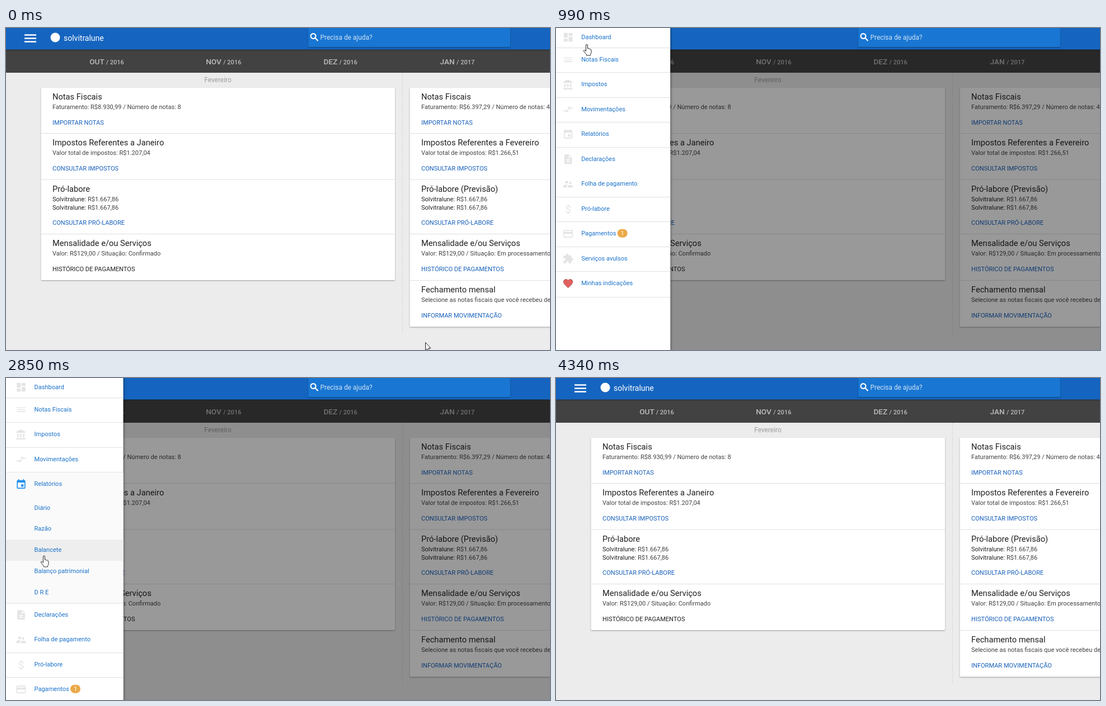
Write an HTML page that moves like this. It is 972 px wide and 576 px high and loops after 4580 ms.

```html
<!DOCTYPE html>
<html lang="pt-BR">
<head>
<meta charset="utf-8">
<title>Menu de relatórios</title>
<style>
  html, body { margin: 0; width: 100%; height: 100%; overflow: hidden; background: #ececec; }
  svg { display: block; width: 972px; height: 576px; font: 11.05px Roboto, sans-serif; }
  .title { font-size: 14.65px; fill: #212121; }
  .text { fill: #424242; }
  .name { fill: #212121; }
  .link { fill: #1760bb; }
  .dark { fill: #212121; }
  .month { font-size: 13.6px; font-weight: 500; fill: #bdbdbd; text-anchor: middle; }
  .month tspan { font-size: 11.05px; }
  .item { fill: #1b72cb; }
  .icon { fill: #e4e4e4; }
  .line { stroke: #e0e0e0; }
  .lift { filter: drop-shadow(0 1px 1px rgba(0, 0, 0, .35)); }
  .side { filter: drop-shadow(1px 0 2px rgba(0, 0, 0, .45)); }

  #shade, #drawer, #active, #hover, #lower, #cursor, #arrow, #hand {
    animation: 4580ms linear infinite paused;
  }
  #shade { animation-name: shade; }
  #drawer { animation-name: drawer; }
  #lower { animation-name: lower; }
  #cursor { animation-name: cursor; }
  #active { animation-name: active; animation-timing-function: step-end; }
  #hover { animation-name: hover; animation-timing-function: step-end; }
  #arrow { animation-name: arrow; animation-timing-function: step-end; }
  #hand { animation-name: hand; animation-timing-function: step-end; }

  @keyframes shade {
    0%, 15.72% { opacity: 0; }
    21.2%, 82.7% { opacity: .4; }
    88.9%, 100% { opacity: 0; }
  }
  @keyframes drawer {
    0%, 15.84% { transform: translateX(-220px); }
    15.86% { transform: translateX(-210px); animation-timing-function: cubic-bezier(.25, .46, .45, .94); }
    22.41%, 81.5% { transform: translateX(0); }
    87.4% { transform: translateX(-210px); }
    87.5%, 100% { transform: translateX(-220px); }
  }
  @keyframes lower {
    0% { transform: translateY(0); }
    39.3% { transform: translateY(0); animation-timing-function: cubic-bezier(.165, .84, .44, 1); }
    49.1%, 100% { transform: translateY(189px); }
  }
  @keyframes active {
    0% { opacity: 0; }
    30%, 100% { opacity: 1; }
  }
  @keyframes hover {
    0% { opacity: 0; transform: translateY(38px); }
    53.8% { opacity: 1; transform: translateY(38px); }
    55.5% { opacity: 1; transform: translateY(76px); }
    57.2% { opacity: 1; transform: translateY(114px); }
    62% { opacity: 1; transform: translateY(76px); }
    65.4% { opacity: 1; transform: translateY(38px); }
    68.7% { opacity: 1; transform: translateY(0); }
    77%, 100% { opacity: 0; transform: translateY(0); }
  }
  @keyframes cursor {
    0% { transform: translate(749px, 562px); animation-timing-function: ease-in-out; }
    11.13%, 12.6% { transform: translate(59px, 28px); }
    13.1% { transform: translate(52px, 26px); }
    16.4%, 23.2% { transform: translate(49px, 29px); }
    26.6% { transform: translate(51px, 132px); }
    28.4% { transform: translate(51px, 150px); }
    31.7% { transform: translate(51px, 178px); }
    35% { transform: translate(50px, 184px); }
    38.4%, 50.4% { transform: translate(51px, 193px); }
    52.2% { transform: translate(54px, 205px); }
    57.2% { transform: translate(66px, 363px); }
    62.2% { transform: translate(62px, 318px); }
    66.8% { transform: translate(50px, 255px); }
    73.8% { transform: translate(45px, 209px); }
    75.5% { transform: translate(90px, 225px); }
    77.3% { transform: translate(195px, 270px); }
    82.7% { transform: translate(614px, 477px); }
    86.25% { transform: translate(783px, 546px); }
    90%, 100% { transform: translate(890px, 600px); }
  }
  @keyframes arrow {
    0% { opacity: 1; }
    13% { opacity: 0; }
    76.5%, 100% { opacity: 1; }
  }
  @keyframes hand {
    0% { opacity: 0; }
    13% { opacity: 1; }
    76.5%, 100% { opacity: 0; }
  }
</style>
</head>
<body>
<svg viewBox="0 0 972 576">
  <rect width="972" height="576" fill="#ececec"/>
  <path d="M708.5 80V547" stroke="#cfcfcf" stroke-dasharray="2 2"/>
  <text x="378.5" y="96.5" text-anchor="middle" font-size="11.9" fill="#9e9e9e">Fevereiro</text>
  <g id="cards"></g>
  <rect y="38" width="972" height="42" fill="#424242"/>
  <g id="months"></g>
  <rect id="shade" y="38" width="972" height="538"/>

  <rect class="lift" width="972" height="38.5" fill="#1565c0"/>
  <path d="M33 12.5H54M33 18.5H54M33 24.5H54" stroke="#fff" stroke-width="2.4"/>
  <circle cx="88" cy="17" r="8.5" fill="#fff"/>
  <text x="103" y="23" font-size="14" fill="#fff">solvitralune</text>
  <path class="lift" d="M540 0H901V32a2 2 0 0 1-2 2H542a2 2 0 0 1-2-2z" fill="#1976d2"/>
  <g fill="none" stroke="#fff" stroke-width="2.2">
    <circle cx="549" cy="14.5" r="4.4"/>
    <path d="M552.3 17.8L557.5 23"/>
  </g>
  <text x="561.5" y="21" font-size="11.9" fill="#cfe2f6">Precisa de ajuda?</text>

  <g id="drawer">
    <rect class="side" y="-10" width="209.5" height="596" fill="#fff"/>
    <g id="upper"></g>
    <g id="sub"></g>
    <g id="lower"><rect y="214" width="209.5" height="600" fill="#fff"/></g>
  </g>

  <g id="cursor" fill="#fff" stroke="#222" stroke-linejoin="round">
    <path id="arrow" d="M.5 .5V14.5L3.7 11.6 6 16.7 8 15.8 5.8 10.8H10z"/>
    <path id="hand" d="M4.5 12.5V2a1.5 1.5 0 0 1 3 0v5.5q2.6-.6 2.8.8 2.2-.5 2.4 1 1.3-.2 1.3 1.7v3.5q0 2-1.5 4V20h-7v-1.5L1 13q-1.3-2 0-2.5 1.2-.4 3.5 2z"/>
  </g>
</svg>
<script>
const add = (id, html) => document.getElementById(id).insertAdjacentHTML('beforeend', html);
const text = (x, y, cls, str) => `<text x="${x}" y="${y}" class="${cls}">${str}</text>`;

// Month bar
['OUT / 2016', 'NOV / 2016', 'DEZ / 2016', 'JAN / 2017'].forEach((m, i) =>
  add('months', `<text class="month" x="${180 + i * 208.8}" y="65">${m.slice(0, 3)} <tspan>${m.slice(4)}</tspan></text>`));

// Cards: each section is [top, title, lines, link, link class]
const payee = '<tspan class="name">Solvitralune:</tspan> R$1.667,86';
function card(x, width, bottom, sections) {
  let out = `<rect class="lift" x="${x}" y="107" width="${width}" height="${bottom - 107}" rx="2" fill="#fff"/>`;
  for (const [top, title, lines, link, cls = 'link'] of sections) {
    if (top > 107) out += `<path class="line" d="M${x} ${top - .5}h${width}"/>`;
    out += text(x + 20.5, top + 21, 'title', title);
    lines.forEach((l, i) => out += text(x + 20.5, top + 38 + i * 15.2, 'text', l));
    out += text(x + 20.5, top + 50.5 + lines.length * 15.2, cls, link);
  }
  add('cards', out);
}
card(62.5, 632.5, 451, [
  [107, 'Notas Fiscais', ['Faturamento: R$8.930,99 / Número de notas: 8'], 'IMPORTAR NOTAS'],
  [189, 'Impostos Referentes a Janeiro', ['Valor total de impostos: R$1.207,04'], 'CONSULTAR IMPOSTOS'],
  [271.5, 'Pró-labore', [payee, payee], 'CONSULTAR PRÓ-LABORE'],
  [369, 'Mensalidade e/ou Serviços', ['Valor: R$129,00 / Situação: Confirmado'], 'HISTÓRICO DE PAGAMENTOS', 'dark'],
]);
card(721.5, 270, 534.5, [
  [107, 'Notas Fiscais', ['Faturamento: R$6.397,29 / Número de notas: 4'], 'IMPORTAR NOTAS'],
  [189, 'Impostos Referentes a Fevereiro', ['Valor total de impostos: R$1.266,51'], 'CONSULTAR IMPOSTOS'],
  [271.5, 'Pró-labore (Previsão)', [payee, payee], 'CONSULTAR PRÓ-LABORE'],
  [369, 'Mensalidade e/ou Serviços', ['Valor: R$129,00 / Situação: Em processamento'], 'HISTÓRICO DE PAGAMENTOS'],
  [452, 'Fechamento mensal', ['Selecione as notas fiscais que você recebeu de clientes'], 'INFORMAR MOVIMENTAÇÃO'],
]);

// Drawer
const calendar = 'M17 12h-5v5h5zM16 1v2H8V1H6v2H5a2 2 0 0 0-2 2v14a2 2 0 0 0 2 2h14a2 2 0 0 0 2-2V5a2 2 0 0 0-2-2h-1V1zm3 18H5V8h14z';
const menu = [
  ['Dashboard', 'M3 13h8V3H3zm0 8h8v-6H3zm10 0h8V11h-8zm0-18v6h8V3z'],
  ['Notas Fiscais', 'M3 7h18v1.6H3zm0 4h18v1.6H3zm0 4h18v1.6H3z'],
  ['Impostos', 'M4 10v7h3v-7zm6 0v7h3v-7zM2 22h19v-3H2zm14-12v7h3v-7zM11.5 1L2 6v2h19V6z'],
  ['Movimentações', 'M9 14H2v2h7v3l4-4-4-4zm6-1v-3h7V8h-7V5l-4 4z'],
  ['Relatórios', calendar],
  ['Declarações', 'M14 2H6a2 2 0 0 0-2 2v16a2 2 0 0 0 2 2h12a2 2 0 0 0 2-2V8zm2 16H8v-2h8zm0-4H8v-2h8zm-3-5V3.5L18.5 9z'],
  ['Folha de pagamento', 'M16.5 12a2.5 2.5 0 1 0 0-5 2.5 2.5 0 0 0 0 5zM9 11a3 3 0 1 0 0-6 3 3 0 0 0 0 6zm7.5 3c-1.8 0-5.5.9-5.5 2.75V19h11v-2.25c0-1.85-3.7-2.75-5.5-2.75zM9 13c-2.3 0-7 1.2-7 3.5V19h7v-2.25c0-.85.3-2.3 2.4-3.5A11 11 0 0 0 9 13z'],
  ['Pró-labore', ''],
  ['Pagamentos', 'M20 4H4a2 2 0 0 0-2 2v12a2 2 0 0 0 2 2h16a2 2 0 0 0 2-2V6a2 2 0 0 0-2-2zm0 14H4v-6h16zm0-10H4V6h16z'],
  ['Serviços avulsos', 'M20.5 11H19V7a2 2 0 0 0-2-2h-4V3.5a2.5 2.5 0 0 0-5 0V5H4a2 2 0 0 0-2 2v3.8h1.5a2.7 2.7 0 0 1 0 5.4H2V20a2 2 0 0 0 2 2h3.8v-1.5a2.7 2.7 0 0 1 5.4 0V22H17a2 2 0 0 0 2-2v-4h1.5a2.5 2.5 0 0 0 0-5z'],
  ['Minhas indicações', 'M12 21C5 15 2.5 12 2.5 8.5A5 5 0 0 1 12 6 5 5 0 0 1 21.5 8.5C21.5 12 19 15 12 21z'],
];
const icon = (y, d, attrs = 'class="icon"') =>
  `<path ${attrs} fill-rule="evenodd" transform="translate(16.8 ${y - 10.2}) scale(.85)" d="${d}"/>`;
const edge = i => 36 + 44.45 * i;

menu.forEach(([label, d], i) => {
  const base = i ? edge(i - 1) + 24 : 19.5;
  const red = 'fill="#e2605f" stroke="#9c4a4a"';
  let out = d ? icon(base - 3, d, i === 10 ? red : undefined)
              : `<text class="icon" x="27" y="${base + 4}" font-size="19" text-anchor="middle">$</text>`;
  out += text(50.5, base, 'item', label);
  if (i !== 4 && i !== 5) out += `<path class="line" d="M0 ${Math.round(edge(i)) - .5 + (i === 10)}h209.5"/>`;
  if (i === 5) out = `<path class="line" d="M0 214h209.5"/>` + out;
  if (label === 'Pagamentos') {
    out += `<rect x="115" y="${base - 11.5}" width="18" height="15" rx="7.5" fill="#eba947"/>
      <text x="124" y="${base}" fill="#fff" text-anchor="middle">1</text>`;
  }
  if (i === 4) {
    out = icon(base - 3, d) + `<g id="active"><rect y="170" width="209.5" height="44" fill="#fafafa"/>
      ${icon(base - 3, d, 'fill="#2090ee"')}</g>` + text(50.5, base, 'item', label);
  }
  add(i < 5 ? 'upper' : 'lower', out);
});

add('sub', '<rect y="213" width="209.5" height="191" fill="#fafafa"/><rect id="hover" y="213" width="209.5" height="38" fill="#eee"/>');
['Diário', 'Razão', 'Balancete', 'Balanço patrimonial', 'D R E'].forEach((s, i) =>
  add('sub', text(50.5, 235.5 + i * 37.9, 'item', s)));

// The picture advances in held steps: [first, last, count] in ms
const loop = 4580;
const ticks = [
  [0, 0, 1], [70, 510, 7], [600, 600, 1], [750, 1220, 7], [1300, 1760, 7], [1840, 2310, 7],
  [2390, 2850, 7], [2920, 3380, 7], [3460, 3950, 7], [4020, 4340, 5],
].flatMap(([a, b, n]) => Array.from({ length: n }, (_, i) => a + (b - a) * i / Math.max(1, n - 1)));

const motions = document.getAnimations();
const start = performance.now();
function draw() {
  const t = (performance.now() - start) % loop;
  const held = ticks.filter(k => k <= t).pop();
  motions.forEach(m => m.currentTime = held);
  requestAnimationFrame(draw);
}
draw();
</script>
</body>
</html>
```
